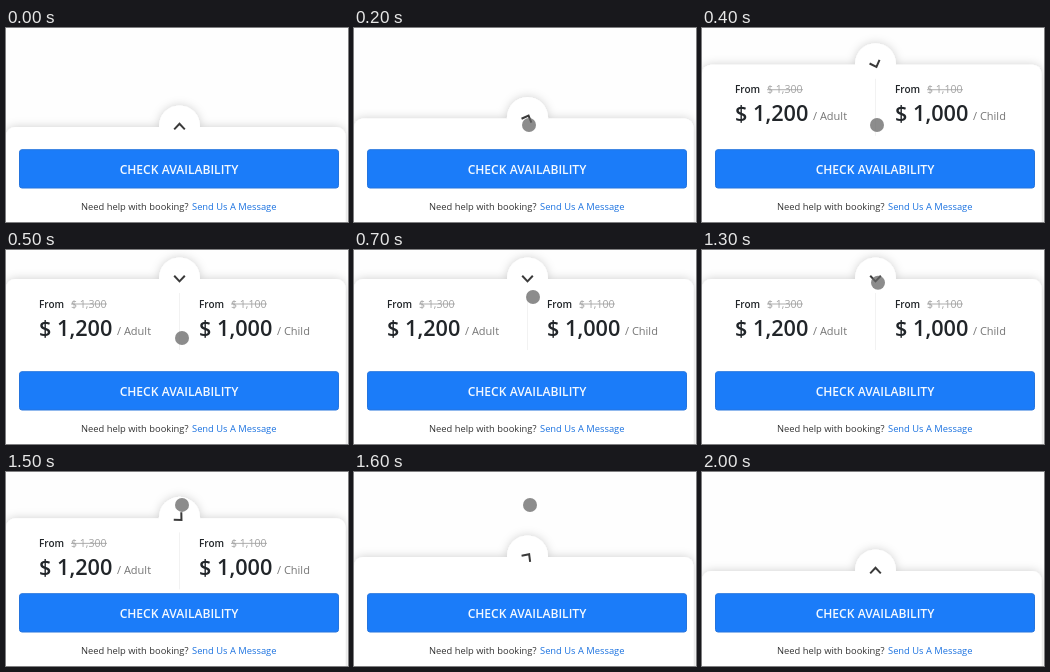
Write an HTML page that moves like this. It is 342 px wide and 194 px high and loops after 2200 ms.

```html
<!DOCTYPE html>
<html lang="en">
<head>
<meta charset="utf-8">
<title>Booking panel</title>
<style>
  html, body { margin: 0; width: 100%; height: 100%; overflow: hidden; background: #fefefe; }
  svg { display: block; width: 100vw; height: 100vh; }
  text { font-family: "Open Sans", "Noto Sans", sans-serif; fill: #212529; }
  .from { font-size: 10px; font-weight: 600; }
  .old { font-size: 10.6px; fill: #a4a4a4; }
  .price { font-size: 21.7px; font-weight: 600; }
  .unit { font-size: 11px; fill: #777; }
  .label { font-size: 12.1px; font-weight: 600; fill: #f4f9ff; }
  .help { font-size: 9.35px; fill: #333; }
  .link { fill: #1b72e0; }
</style>
</head>
<body>
<svg viewBox="0 0 342 194">
  <defs>
    <filter id="shadow" filterUnits="userSpaceOnUse" x="-20" y="-50" width="382" height="280">
      <feDropShadow dx="0" dy="0" stdDeviation="5" flood-color="#000" flood-opacity=".19"/>
    </filter>
  </defs>
  <g id="panel">
    <g fill="#fff" filter="url(#shadow)">
      <rect width="339.5" height="220" rx="9"/>
      <circle cx="173.5" cy="-1" r="20.5"/>
    </g>
    <path id="chevron" d="M-5.3 2.8 L0 -2.8 L5.3 2.8" fill="none" stroke="#3a3a3a" stroke-width="2"/>
    <g id="prices">
      <path d="M173.5 14 V71" stroke="#f2f2f2"/>
    </g>
  </g>
  <rect x="13.5" y="121.7" width="319" height="38.3" rx="2.5" fill="#1b7cf9" stroke="#2474de"/>
  <text class="label" x="173" y="146" text-anchor="middle">CHECK AVAILABILITY</text>
  <text class="help" x="75" y="181.7">Need help with booking?</text>
  <text class="help link" x="186" y="181.7">Send Us A Message</text>
  <circle id="pointer" r="7" fill="#666" fill-opacity=".75"/>
</svg>
<script>
  const LOOP = 2200, STEP = 100;
  const CLOSED_Y = 99, TRAVEL = 70;
  const OPENING = { start: 108, duration: 380 };
  const CLOSING = { start: 1400, duration: 290 };
  const POINTER_ON = 100, POINTER_OFF = 1800;
  const pointerPath = [
    [400, 175, 97], [500, 176, 88], [600, 178, 67],
    [700, 179, 47], [800, 178, 38], [1000, 176, 32.4], [1600, 176, 33]
  ];

  const byId = id => document.getElementById(id);
  const panel = byId("panel"), chevron = byId("chevron");
  const prices = byId("prices"), pointer = byId("pointer");
  const clamp = v => Math.min(1, Math.max(0, v));

  function addNode(tag, attributes, content = "") {
    const node = document.createElementNS("http://www.w3.org/2000/svg", tag);
    for (const [name, value] of Object.entries(attributes)) node.setAttribute(name, value);
    node.textContent = content;
    prices.append(node);
  }

  const addText = (cls, x, y, content) => addNode("text", { class: cls, x, y }, content);

  function addPrice(x, oldPrice, price, unit) {
    addText("from", x, 28.5, "From");
    addText("old", x + 32, 28.5, oldPrice);
    addNode("path", { d: `M${x + 32} 25 h36`, stroke: "#a4a4a4", "stroke-width": .9 });
    addText("price", x, 56.6, price);
    addText("unit", x + 78, 55.6, unit);
  }

  addPrice(33, "$ 1,300", "$ 1,200", "/ Adult");
  addPrice(193, "$ 1,100", "$ 1,000", "/ Child");

  // Same curve as CSS ease-in-out, solved by bisection.
  function easeInOut(x) {
    let lo = 0, hi = 1;
    for (let i = 0; i < 24; i++) {
      const s = (lo + hi) / 2, r = 1 - s;
      const at = 1.26 * r * r * s + 1.74 * r * s * s + s * s * s;
      if (at < x) lo = s; else hi = s;
    }
    return lo * lo * (3 - 2 * lo);
  }

  const progress = (t, { start, duration }) => easeInOut(clamp((t - start) / duration));

  function pointerAt(t) {
    const next = pointerPath.findIndex(([time]) => time > t);
    if (next === 0) return pointerPath[0].slice(1);
    if (next < 0) return pointerPath.at(-1).slice(1);
    const [t0, x0, y0] = pointerPath[next - 1], [t1, x1, y1] = pointerPath[next];
    const k = (t - t0) / (t1 - t0);
    return [x0 + (x1 - x0) * k, y0 + (y1 - y0) * k];
  }

  function draw(t) {
    const open = progress(t, OPENING) - progress(t, CLOSING);
    panel.setAttribute("transform", `translate(0 ${CLOSED_Y - TRAVEL * open})`);
    chevron.setAttribute("transform", `translate(173.5 -.4) rotate(${180 * open})`);
    prices.setAttribute("opacity", clamp((open - .25) / .5));

    const [x, y] = pointerAt(t);
    pointer.setAttribute("cx", x);
    pointer.setAttribute("cy", y);
    pointer.setAttribute("visibility", t >= POINTER_ON && t < POINTER_OFF ? "visible" : "hidden");
  }

  const begin = performance.now();
  function tick() {
    const t = (performance.now() - begin) % LOOP;
    draw(Math.floor(t / STEP) * STEP);
    requestAnimationFrame(tick);
  }
  tick();
</script>
</body>
</html>
```
